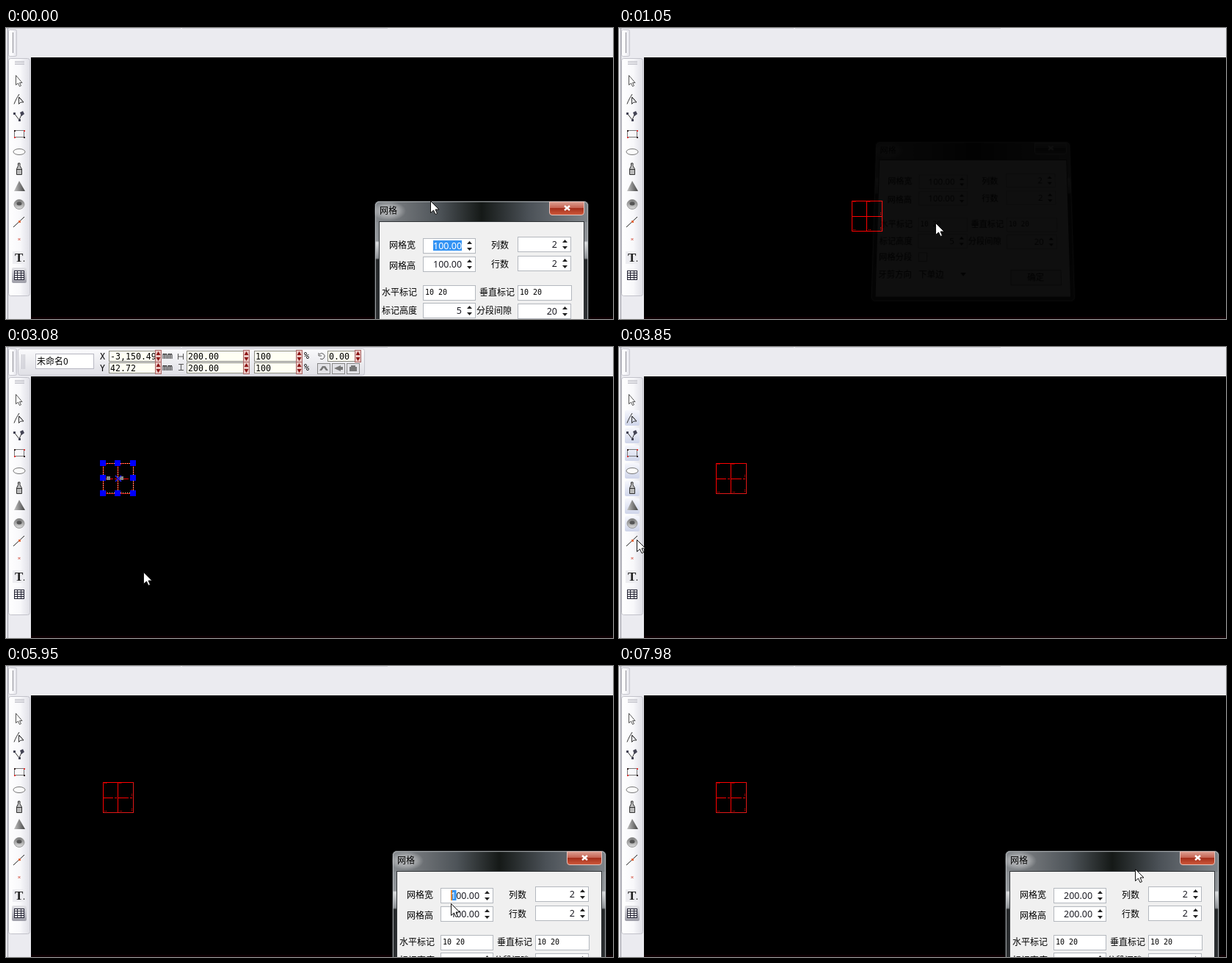
These frames come from a looping animation (827x396 px, 8 s). An HTML page:

```html
<!DOCTYPE html>
<html lang="zh">
<head>
<meta charset="utf-8">
<title>网格</title>
<style>
html, body { margin: 0; width: 100%; height: 100%; overflow: hidden; background: #ebebf0; }
svg { position: absolute; left: 0; top: 0; overflow: hidden; }
#dialog { transform-origin: 146px 118px; }
text { font: 12px "Noto Sans CJK SC", "Noto Sans CJK", sans-serif; white-space: pre; }
.num { font: 12.5px "Noto Sans", "Open Sans", sans-serif; fill: #1c1c24; }
.mono { font: 10px "DejaVu Sans Mono", "Noto Sans Mono", monospace; }
.big { font-size: 11.6px; }
.end { text-anchor: end; }
</style>
</head>
<body>
<svg id="stage" width="827" height="396" viewBox="0 0 827 396">
  <defs>
    <linearGradient id="panel"><stop stop-color="#fff"/><stop offset=".55" stop-color="#f8f8fb"/><stop offset="1" stop-color="#dfdfe6"/></linearGradient>
    <linearGradient id="strip" x2="0" y2="1"><stop stop-color="#fafafc"/><stop offset="1" stop-color="#dfdfe5"/></linearGradient>
    <linearGradient id="hot" x2="0" y2="1"><stop stop-color="#f6f7fd"/><stop offset="1" stop-color="#cfd5ea"/></linearGradient>
    <linearGradient id="press" x2="0" y2="1"><stop stop-color="#e4e4e8"/><stop offset="1" stop-color="#9c9ca6"/></linearGradient>
    <linearGradient id="cone"><stop stop-color="#c4c4c4"/><stop offset="1" stop-color="#444"/></linearGradient>
    <linearGradient id="ball" x2="0" y2="1"><stop stop-color="#777"/><stop offset=".5" stop-color="#aaa"/><stop offset="1" stop-color="#e0e0e0"/></linearGradient>
  </defs>
  <path d="M0 .5H238M240 .5H520" stroke="#cfcfd6"/>
  <path d="M2.500 0V396" stroke="#9b9ba3"/>
  <rect x="34" y="40" width="793" height="356"/>
  <rect x="34" y="393" width="793" height="3" fill="#0d0003"/>
  <rect x="3.500" y="2.500" width="11" height="36" rx="2" fill="url(#panel)" stroke="#c6c6ce"/>
  <path d="M9.500 6V34" stroke="#8e8e96"/>
  <g id="bar"></g>
  <rect x="3.500" y="41.500" width="29" height="323" rx="3" fill="url(#panel)" stroke="#c2c2ca"/>
  <path d="M12 45.500H25M12 47.500H25M12 49.500H25" stroke="#bdbdc5"/>
  <g id="hots"></g>
  <rect id="pressed" x="8" y="326" width="20" height="21" rx="2" fill="url(#press)"/>
  <g fill="none" stroke="#333">
    <path d="M13.500 64.500V77.500L16.500 75 18.500 79.500 20.500 78.500 18.500 74.500H22Z" fill="#fff" stroke="#555"/>
    <path d="M11 103.500C13 98 15 95 18 90M17.500 94V103.500L20 101H24ZL24 101"/>
    <path d="M11 116L18 125 21 118"/>
    <path d="M10 115h3v3h-3zM17 124h3v3h-3zM19 115l4-2 2 4-4 3z" fill="#445" stroke="none"/>
    <rect x="11.500" y="139.500" width="13" height="9" stroke="#777"/>
    <path d="M11 139h2v2h-2zM24 148h2v2h-2z" fill="#322" stroke="none"/>
    <path d="M24 139h2v2h-2zM11 148h2v2h-2z" fill="#d33" stroke="none"/>
    <ellipse cx="18" cy="168.500" rx="8" ry="4" stroke="#777" fill="#fafafa"/>
    <path d="M14.500 199.500V192L16.500 187.500V184H19V187.500L21.500 192V199.500ZM14.500 192.500H21.500" fill="#bbb"/>
    <path d="M18 208L26 222H11Z" fill="url(#cone)" stroke="none"/>
    <ellipse cx="18" cy="240" rx="7" ry="6.500" fill="url(#ball)" stroke="#999"/>
    <ellipse cx="18" cy="239" rx="3.500" ry="2.500" fill="#555" stroke="none"/>
    <path d="M10 271L25 257" stroke="#222"/>
    <path d="M17 262h3v3h-3z" fill="#e06a40" stroke="none"/>
    <path d="M16.500 286l3 3M19.500 286l-3 3" stroke="#d86050"/>
    <rect x="9" y="304" width="18" height="17" fill="#ededf1" stroke="none"/>
    <rect x="11.500" y="330.500" width="13" height="12" fill="#fff" stroke="#223"/>
    <path d="M11 333.500H25M11 336.500H25M11 339.500H25M15.500 330V343M20.500 330V343" stroke="#223"/>
  </g>
  <text x="12" y="318" style="font:bold 17px 'Liberation Serif',serif" fill="#222">T<tspan font-size="10">.</tspan></text>
  <g id="grid">
    <path d="M0 .5H41M.5 0V41M20.500 0V41" stroke="#f00"/>
    <path id="midLine" d="M0 21.500H41" stroke="#f00"/>
    <path id="outer" d="M0 41.500H42M41.500 0V42" stroke="#f00"/>
    <path d="M2 1.500H6M22 1.500H26M2 39.500H5M23 39.500H26M39.500 16V20M39.500 36V40" stroke="#e00" stroke-dasharray="1 1"/>
    <g id="marks">
      <path d="M0 .5H41M.5 0V41M20.500 0V41M0 40.500H41M41.500 0V41" stroke="#ffe9a0" stroke-dasharray="1 2"/>
      <path d="M5 18h5v5H5zM23 18h5v5h-5z" fill="#888"/>
      <path d="M17 17l8 8M25 17l-8 8" stroke="#22f" stroke-width="1.500"/>
      <path id="handles" fill="#00f"/>
    </g>
  </g>
</svg>
<svg id="dialog" width="292" height="236" viewBox="-1 -1 292 236">
  <defs>
    <linearGradient id="glass"><stop stop-color="#85898d"/><stop offset=".14" stop-color="#6d7175"/><stop offset=".3" stop-color="#4e5459"/><stop offset=".5" stop-color="#151917"/><stop offset=".72" stop-color="#4b5157"/><stop offset="1" stop-color="#7e8388"/></linearGradient>
    <linearGradient id="edge" x2="0" y2="1"><stop stop-color="#80858a"/><stop offset=".23" stop-color="#909498"/><stop offset=".24" stop-color="#dadcde"/><stop offset=".33" stop-color="#8b8f93"/><stop offset=".34" stop-color="#25282a"/><stop offset="1" stop-color="#36393c"/></linearGradient>
    <linearGradient id="red" x2="0" y2="1"><stop stop-color="#dda093"/><stop offset=".48" stop-color="#c4604f"/><stop offset=".5" stop-color="#a52f1c"/><stop offset="1" stop-color="#cf5a3c"/></linearGradient>
    <radialGradient id="glow"><stop stop-color="#fff" stop-opacity=".55"/><stop offset=".6" stop-color="#fff" stop-opacity=".3"/><stop offset="1" stop-color="#fff" stop-opacity="0"/></radialGradient>
  </defs>
  <rect x="-.5" y="-.5" width="291" height="235" rx="6" fill="url(#edge)" stroke="#2a2c2e"/>
  <path d="M0 28V6Q0 0 6 0H284Q290 0 290 6V28Z" fill="url(#glass)"/>
  <rect id="haze" x="0" y="0" width="290" height="234" rx="6" fill="#8ca6bc" opacity=".4"/>
  <rect x=".5" y=".5" width="289" height="233" rx="5" fill="none" stroke="#c8cccf" stroke-opacity=".7"/>
  <ellipse cx="19" cy="13" rx="23" ry="13" fill="url(#glow)"/>
  <text x="6" y="17">网格</text>
  <path d="M237.500 .5H284.500V15Q284.500 18.500 281 18.500H241Q237.500 18.500 237.500 15Z" fill="url(#red)" stroke="#e6c4bd"/>
  <path d="M258 6L265 12M265 6L258 12" stroke="#fff" stroke-width="2.400"/>
  <rect x="5.500" y="27.500" width="279" height="201" fill="#f0f0f0" stroke="#303437"/>
  <g id="form"></g>
</svg>
<svg width="827" height="396" viewBox="0 0 827 396">
  <path id="arrow" d="M.5 .5V16.500L4.500 13 7 18.500 9.500 17.500 7 12H12Z" fill="#fff" stroke="#111"/>
  <path id="mover" d="M0-11L4-6H1V-1H6V-4L11 0 6 4V1H1V6H4L0 11-4 6H-1V1H-6V4L-11 0-6-4V-1H-1V-6H-4Z" fill="#fff" stroke="#000" stroke-width=".6"/>
</svg>
<script>
const $ = id => document.getElementById(id);
const show = (id, on) => $(id).style.display = on ? '' : 'none';
const text = (x, y, s, cls = '') => `<text class="${cls}" x="${x}" y="${y}">${s}</text>`;
const box = (x, y, w, h, stroke = '#b4b8be', fill = '#fff') =>
  `<rect x="${x + .5}" y="${y + .5}" width="${w - 1}" height="${h - 1}" fill="${fill}" stroke="${stroke}"/>`;

// Dialog form
const spin = (x, y, w, value) => box(x, y, w, 21) +
  `<path d="M${x + w - 12} ${y + 8}h7l-3.500-4zM${x + w - 12} ${y + 13}h7l-3.500 4z" fill="#222"/>` +
  (value ? text(x + w - 19, y + 15, value, 'num end') : '');
$('form').innerHTML =
  spin(65, 50, 72) + spin(65, 75, 72) + spin(194, 48, 73, '2') + spin(194, 74, 73, '2') +
  '<g id="v1"></g><g id="v2"></g>' +
  box(65, 114, 72, 21) + box(194, 114, 74, 21) +
  text(68, 127, '10 20', 'mono') + text(197, 127, '10 20', 'mono') +
  spin(65, 138, 72, '5') + spin(194, 139, 73, '20') +
  [[19, 64, '网格宽'], [158, 64, '列数'], [19, 92, '网格高'], [158, 90, '行数'],
   [9, 128, '水平标记'], [142, 128, '垂直标记'], [9, 153, '标记高度'], [138, 153, '分段间隙'],
   [9, 176, '网格分段'], [9, 201, '牙剪方向'], [67, 201, '下单边']].map(a => text(...a)).join('') +
  box(66, 165, 13, 13, '#8a8f94') + '<path d="M127 194h8l-4 5z" fill="#222"/>' +
  box(199, 190, 73, 22, '#808488', '#e4e4e4') + text(223, 205, '确定');

// Property bar
const field = (x, y, w, value) => box(x, y, w, 15, '#8a8a80', '#fffff4') +
  text(x + 2, y + 12, value, 'mono big') + box(x + w - 1, y - 1, 9, 17, '#a66', '#e9c8c4') +
  `<path d="M${x + w + .5} ${y + 6}h6l-3-5zM${x + w + .5} ${y + 9}h6l-3 5z" fill="#8c1414"/>`;
const row = (y, name, pos) =>
  text(128, y + 12, name, 'mono big') + field(140, y, 64, pos) + text(213, y + 11, 'mm', 'mono big') +
  field(246, y, 78, '200.00') + field(338, y, 58, '100') + text(406, y + 11, '%', 'mono big');
$('bar').innerHTML =
  '<rect x="16.500" y="2.500" width="472" height="36" rx="3" fill="url(#strip)" stroke="#c6c6ce"/>' +
  '<path d="M21.500 10V30M23.500 10V30M25.500 10V30" stroke="#c4c4cc"/>' +
  box(40, 9, 80, 21, '#b8b8c2') + text(42, 24, '未命名0') +
  row(5, 'X', '-3,150.49') + row(21, 'Y', '42.72') + field(438, 5, 38, '0.00') +
  '<path d="M234.500 9V17M241.500 9V17M235 13H241M235 23.500H242M235 31.500H242M238.500 24V31M427 10a4 4 0 1 1 1 6M426 8v4h4" fill="none" stroke="#555"/>' +
  [424, 444, 464].map(x => box(x, 22, 18, 15, '#888', '#e2e2e6')).join('') +
  '<path d="M427 32l4-6h4l4 6h-3l-3-4-3 4zM447 29l9-4v2h3v4h-3v2zM468 27h10v6h-10zM470 25h6v2h-6z" fill="#777"/>';

$('hots').innerHTML = Array.from({ length: 12 }, (_, i) =>
  `<rect x="8" y="${62 + i * 24}" width="20" height="21" rx="2" fill="url(#hot)"/>`).join('');
const hots = [...$('hots').children];

let d = '';
for (const x of [0, 20, 41]) for (const y of [0, 20, 41])
  if (x !== 20 || y !== 20) d += `M${x - 4} ${y - 4}h8v8h-8z`;
$('handles').setAttribute('d', d);

// Paths as [time, x, y]
const cursorPath = [
  [0, 578, 235], [420, 415, 139], [490, 415, 139], [770, 567, 340], [840, 567, 340],
  [1050, 431, 265], [1260, 406, 242], [1610, 406, 242], [1820, 375, 290], [1960, 342, 255],
  [2100, 342, 255], [2240, 261, 233], [2520, 157, 177], [2590, 157, 177], [3080, 187, 306],
  [3150, 187, 306], [3500, 20, 86], [3850, 24, 262], [3990, 17, 343], [4340, 18, 346],
  [4410, 18, 346], [4480, 120, 274], [4620, 441, 220], [4970, 614, 310], [5320, 614, 307],
  [5670, 590, 307], [5740, 590, 307], [5950, 606, 323], [6230, 620, 328], [6300, 620, 328],
  [6860, 625, 345], [6930, 616, 330], [7280, 586, 328], [7490, 590, 328], [7770, 719, 290], [7980, 703, 276]];
const gridPath = [[2100, 317, 235], [2240, 249, 220], [2520, 132, 158]];

function at(path, t) {
  const i = path.findIndex(p => p[0] > t);
  if (i === 0) return path[0].slice(1);
  if (i < 0) return path[path.length - 1].slice(1);
  const a = path[i - 1], b = path[i], k = (t - a[0]) / (b[0] - a[0]);
  return [1, 2].map(n => Math.round(a[n] + (b[n] - a[n]) * k));
}
const place = (id, [x, y]) => $(id).setAttribute('transform', `translate(${x} ${y})`);

// A number whose leading characters may be selected
function setValue(id, y, first, chars) {
  const s = first + '00.00';
  const html = (chars ? `<rect x="79" y="${y - 12}" width="${chars > 1 ? 39 : 7.5}" height="14" fill="#3393f4"/>` : '') +
    (chars === 1 ? `<rect x="79" y="${y - 12}" width="2" height="14" fill="#e08838"/>` : '') +
    text(79, y, `<tspan fill="${chars ? '#fff' : '#1c1c24'}">${s.slice(0, chars)}</tspan>${s.slice(chars)}`, 'num');
  if ($(id).dataset.html !== html) $(id).innerHTML = $(id).dataset.html = html;
}

function drawDialog(t) {
  const closing = t >= 910 && t < 1120;
  const opening = t >= 4550 && t < 4690;
  const on = t < 1120 || t >= 4550;
  show('dialog', on);
  if (!on) return;
  const [x, y] = t < 1120 ? at([[0, 502, 235], [420, 339, 140]], t) : [526, 251];
  const s = $('dialog').style;
  s.left = x + 'px';
  s.top = y + 'px';
  s.opacity = 1;
  s.transform = 'none';
  s.filter = closing ? 'grayscale(1)' : 'none';
  if (closing) {
    const n = (t - 910) / 70, k = .024 + n * .022;
    s.opacity = [.6, .25, .06][n];
    s.transform = `translate(${-k * 40}px,${k * 40}px) perspective(600px) rotateX(${k * 118}deg) scale(${1 - k})`;
  } else if (opening) {
    const k = t < 4620 ? .05 : .022;
    s.opacity = t < 4620 ? .4 : .83;
    s.transform = `translateY(${-k * 57}px) scale(${1 - k})`;
  }
  show('haze', opening);
  const all = t < 910 || t >= 4550 && t < 5390;
  setValue('v1', 65, t >= 6160 ? 2 : 1, all ? 6 : t >= 5460 && t < 6160 ? 1 : 0);
  setValue('v2', 90, t >= 7420 ? 2 : 1, t >= 7140 && t < 7420 ? 1 : 0);
}

function draw(t) {
  const selected = t >= 1890 && t < 3290;
  const moving = t >= 1960 && t < 2730;
  const moved = t >= 2520;
  drawDialog(t);
  show('bar', selected);
  show('marks', selected);
  show('grid', t >= 1050);
  place('grid', at(gridPath, t));
  $('midLine').setAttribute('stroke-dasharray', moved ? '14 2 3 2' : 'none');
  $('outer').setAttribute('stroke', moved ? '#e01818' : '#f00');
  show('pressed', t < 980 || t >= 4340);
  hots.forEach((h, i) => {
    h.style.display = t >= 3500 + i * 45 && t < 3840 + i * 50 ? '' : 'none';
  });
  show('arrow', !moving);
  show('mover', moving);
  const p = at(cursorPath, t);
  place('arrow', p);
  place('mover', p);
}

const STEP = 70, LOOP = 8000;
const start = performance.now();
function tick() {
  const t = (performance.now() - start) % LOOP;
  draw(Math.floor(t / STEP) * STEP);
  requestAnimationFrame(tick);
}
tick();
</script>
</body>
</html>
```
